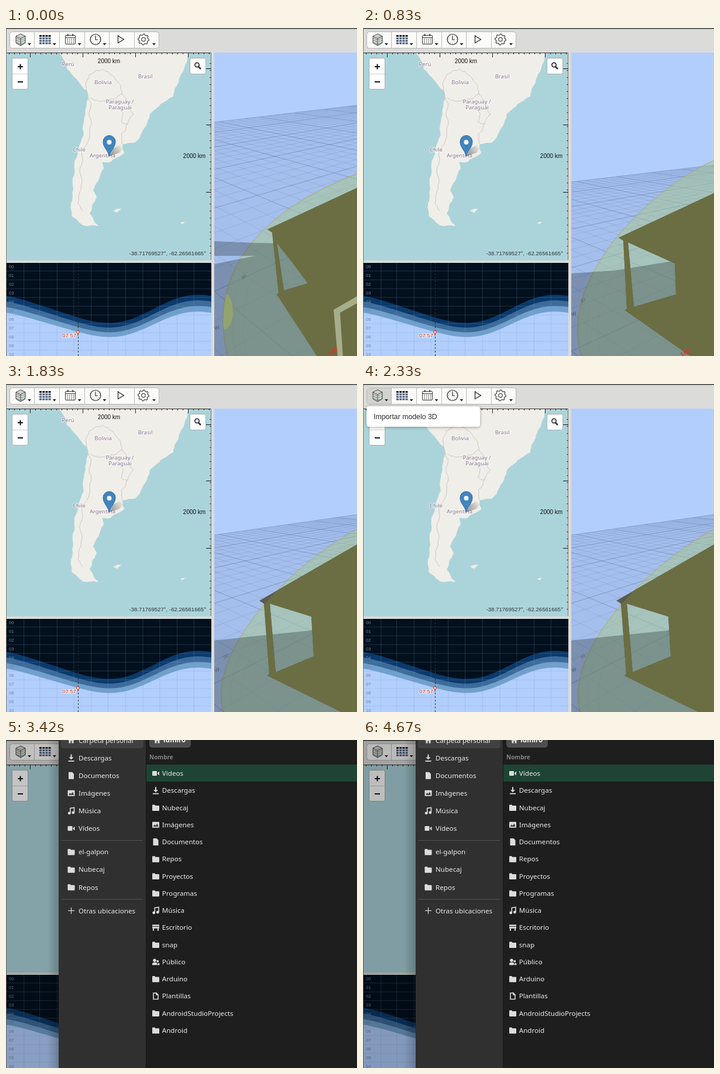
Recreate the animation shown at these times as an HTML page with a canvas. Size 600 px wide and 560 px high, loop 4750 ms.

```html
<!DOCTYPE html>
<html lang="es">
<head>
<meta charset="utf-8">
<title>Modelo 3D</title>
<style>
html, body { margin: 0; width: 100%; height: 100%; overflow: hidden; background: #d9d9d7; }
canvas { display: block; width: 600px; height: 560px; }
</style>
</head>
<body>
<canvas id="stage" width="600" height="560"></canvas>
<script>
const c = document.getElementById('stage').getContext('2d');
const LOOP = 4750, FPS = 12;
const SANS = '"Liberation Sans", sans-serif', NOTO = '"Noto Sans", sans-serif';

// ---------- helpers ----------
function rect(x, y, w, h, fill) { c.fillStyle = fill; c.fillRect(x, y, w, h); }
function box(x, y, w, h, r, fill, stroke) {
  c.beginPath(); c.roundRect(x, y, w, h, r);
  if (fill) { c.fillStyle = fill; c.fill(); }
  if (stroke) { c.strokeStyle = stroke; c.lineWidth = 1; c.stroke(); }
}
function trace(pts) { pts.forEach(([x, y], i) => i ? c.lineTo(x, y) : c.moveTo(x, y)); }
function poly(pts, fill) { c.beginPath(); trace(pts); c.closePath(); c.fillStyle = fill; c.fill(); }
function line(pts, color, width = 1) {
  c.beginPath(); trace(pts); c.strokeStyle = color; c.lineWidth = width; c.stroke();
}
function disc(x, y, r, fill) { c.beginPath(); c.arc(x, y, r, 0, 7); c.fillStyle = fill; c.fill(); }
function ring(x, y, r, color, width = 1) {
  c.beginPath(); c.arc(x, y, r, 0, 7); c.strokeStyle = color; c.lineWidth = width; c.stroke();
}
function text(s, x, y, font, fill, align = 'left') {
  c.font = font; c.fillStyle = fill; c.textAlign = align; c.fillText(s, x, y);
}
function tilted(s, x, y, angle, font, fill) {
  c.save(); c.translate(x, y); c.rotate(angle); text(s, 0, 4, font, fill, 'center'); c.restore();
}
function clipped(x, y, w, h, draw) {
  c.save(); c.beginPath(); c.rect(x, y, w, h); c.clip(); draw(); c.restore();
}
const mix = (a, b, p) => Array.isArray(a) ? a.map((v, i) => mix(v, b[i], p)) : a + (b - a) * p;
const clamp = v => Math.max(0, Math.min(1, v));
const smooth = v => v * v * (3 - 2 * v);
const easeOut = v => 1 - (1 - v) ** 2;

// ---------- 3D view ----------
// Each pose: far edge heights, dome curve, shadow heights, roof tip, eave height, wall foot, wall base, opening
const poses = [
  { edge: [161, 132], dome: [[600, 249], [470, 298], [335, 395], [380, 565]], shade: [364, 367, 369],
    apex: [447, 344], eave: 273, foot: [463, 455], base: 533, hole: [[463, 367], [490, 401], [516, 436], [475, 448]] },
  { edge: [263, 234], dome: [[600, 226], [490, 275], [322, 435], [378, 572]], shade: [419, 414, 398],
    apex: [437, 358], eave: 282, foot: [448, 482], base: 562, hole: [[453, 366], [533, 402], [535, 455], [463, 476]] },
  { edge: [258, 223], dome: [[600, 248], [480, 312], [330, 470], [376, 572]], shade: [438, 430, 420],
    apex: [433, 370], eave: 274, foot: [447, 498], base: 577, hole: [[451, 375], [522, 397], [526, 465], [461, 492]] }
];
const camera = k => smooth(clamp((k - 3) / 7)) + easeOut(clamp((k - 10) / 10));

function grid([left, right]) {
  const hy = left - 100, far = 24400 / (left - right);
  const ray = (vx, off, major) => {
    const at = x => [x, hy + (x - vx) * 100 / off];
    line([at(350), at(606)], major ? 'rgba(72,98,150,.5)' : 'rgba(85,115,175,.26)', .8);
  };
  for (let i = 1, off = far - 25; off > 60; i++, off -= 25) ray(356 + far, -off, i % 5 === 0);
  for (let i = 2; i < 42; i++) ray(-110, i * 24, i % 5 === 0);
}

function domePath(pts, close) {
  c.beginPath(); c.moveTo(...pts[0]); c.bezierCurveTo(...pts.slice(1).flat());
  if (close) { c.lineTo(600, 572); c.closePath(); }
}

function drawView(k) {
  const p = camera(k), i = Math.min(1, Math.floor(p)), v = {};
  for (const part in poses[i]) v[part] = mix(poses[i][part], poses[i + 1][part], p - i);
  const floor = [[356, v.edge[0]], [600, v.edge[1]], [600, 560], [356, 560]];

  rect(356, 42, 244, 518, '#b1cefd');
  c.save();
  poly(floor, '#a5bfec');
  c.clip();
  grid(v.edge);
  c.restore();
  line(floor.slice(0, 2), '#7f9ac9');

  // sky dome with sun paths
  domePath(v.dome, true); c.fillStyle = 'rgba(168,200,142,.5)'; c.fill();
  domePath(v.dome); c.strokeStyle = '#b9a766'; c.lineWidth = 1; c.stroke();
  c.setLineDash([3, 3]);
  for (const s of [.94, .87]) {
    domePath(v.dome.map(([x, y]) => [mix(630, x, s), mix(530, y, s)]));
    c.strokeStyle = 'rgba(185,168,80,.45)'; c.lineWidth = .8; c.stroke();
  }
  c.setLineDash([]);

  // ground shadow with a lit wedge that closes as the camera turns
  const lit = clamp(1 - p), wy = v.shade[0] + 25;
  c.beginPath();
  trace([...v.shade.map((y, j) => [[356, 430, 530][j], y]), [600, v.shade[2]], [600, 560], [356, 560]]);
  c.closePath();
  trace([[356, wy], [356 + 71 * lit, wy], [356, wy + 14 * lit]]); c.closePath();
  c.fillStyle = 'rgba(10,15,15,.27)'; c.fill('evenodd');
  c.save();
  domePath(v.dome, true); c.clip();
  c.beginPath(); c.ellipse(374 - 8 * (1 - lit), 484, 4 + 10 * lit, 8 + 22 * lit, 0, 0, 7);
  c.fillStyle = 'rgba(175,185,75,.45)'; c.fill();
  c.restore();
  tilted('30', 375 + 31 * lit, 464 - 40 * lit, -.6, '8px ' + SANS, 'rgba(60,66,70,.55)');
  tilted('W', 360, 487 + 24 * lit, -.35, '9px ' + SANS, 'rgba(55,65,85,.7)');

  // building: grey where it leaves the dome
  const [ax, ay] = v.apex, [fx, fy] = v.foot;
  const walls = new Path2D(), add = pts => {
    pts.forEach(([x, y], j) => j ? walls.lineTo(x, y) : walls.moveTo(x, y));
    walls.closePath();
  };
  add([v.apex, [600, v.eave], [600, 562], [v.base, 562], v.foot, [fx + 3, fy - 3], [ax + 8, ay + 5]]);
  add(v.hole);
  c.fillStyle = '#5b5b50'; c.fill(walls, 'evenodd');
  c.save();
  domePath(v.dome, true); c.clip();
  c.fillStyle = '#6b6e42'; c.fill(walls, 'evenodd');
  c.restore();
  poly([[560, 481], [600, 458], [600, 470], [571, 486], [576, 562], [567, 562]]
    .map(([x, y]) => [x + 40 * p, y + 110 * p]), '#a7ae8b');
  tilted('180', 558 - 8 * p, 551 + 3 * p + 30 * Math.max(0, p - 1), -.5, 'bold 10px ' + SANS, '#d8352a');
}

// ---------- map ----------
function roughen(pts, amount, seed) {
  const rnd = () => (seed = seed * 16807 % 2147483647) / 2147483647 - .5;
  for (let pass = 0; pass < 3; pass++)
    pts = pts.flatMap((a, i) => {
      const b = pts[i + 1];
      if (!b) return [a];
      const r = rnd() * amount, dx = b[0] - a[0], dy = b[1] - a[1];
      return [a, [a[0] + dx / 2 - dy * r, a[1] + dy / 2 + dx * r]];
    });
  return pts;
}
const coast = roughen([[88, 42], [104, 70], [138, 107], [133, 160], [124, 205], [117, 250], [111, 300],
  [112, 320], [132, 337], [158, 338], [143, 316], [155, 290], [149, 278], [157, 262], [167, 240],
  [164, 229], [180, 228], [202, 214], [199, 199], [220, 196], [237, 170], [246, 147], [264, 130],
  [286, 117], [292, 98], [303, 74], [311, 42]], .2, 11);
const borders = [
  [[138, 107], [142, 150], [133, 205], [127, 250], [123, 300], [131, 312]],
  [[138, 107], [142, 80], [165, 70], [196, 98], [198, 112], [174, 124], [144, 119]],
  [[174, 124], [200, 145], [197, 160], [208, 164], [218, 147], [198, 112]],
  [[207, 164], [197, 182], [198, 198]]
].map((b, i) => roughen(b, .25, 31 + i));
const places = [['Perú', 106, 65], ['Bolivia', 166, 96], ['Brasil', 238, 86], ['Paraguay /', 194.5, 129],
  ['Paraguái', 195, 139], ['Chile', 125, 211], ['Argentina', 165, 221]];

function drawMap() {
  rect(1, 42, 350, 355, '#abd4da');
  poly(coast, '#f0eee8');
  borders.forEach(b => line(b, '#cdc6ca', 1));
  for (const [x, y, r] of [[190, 312, 7], [302, 333, 4]])
    poly([[x - r, y], [x, y - r / 2], [x + r, y - r / 2], [x, y + r / 2]], '#edece4');
  places.forEach(([s, x, y]) => {
    c.strokeStyle = 'rgba(255,255,255,.7)'; c.lineWidth = 2;
    c.font = '9.5px ' + NOTO; c.textAlign = 'center'; c.strokeText(s, x, y);
    text(s, x, y, c.font, '#84708e', 'center');
  });

  line([[1, 42.5], [351, 42.5]], '#333');
  line([[350.5, 42], [350.5, 396]], '#777');
  for (let i = 0; i < 39; i++) rect(5 + i * 9, 42, 1, i % 10 === 4 ? 8 : 3, '#222');
  for (const y of [69, 165, 280]) rect(342, y, 9, 1, '#111');
  for (let y = 60; y < 396; y += 12) rect(348, y, 3, 1, '#444');
  text('2000 km', 176, 60, '10px ' + SANS, '#111', 'center');
  text('2000 km', 322, 222, '10px ' + SANS, '#111', 'center');
  text('-38.71769527°, -62.26561665°', 342, 387.5, '9.6px ' + SANS, '#2b3438', 'right');

  // pin
  const g = c.createLinearGradient(178, 216, 200, 202);
  g.addColorStop(0, 'rgba(60,60,60,.5)'); g.addColorStop(1, 'rgba(60,60,60,0)');
  poly([[177, 219], [183, 206], [194, 200], [200, 205], [194, 213]], g);
  c.beginPath(); c.moveTo(176.5, 219);
  c.bezierCurveTo(174, 208, 166, 204, 166, 194);
  c.arc(176.5, 194, 10.5, Math.PI, 0);
  c.bezierCurveTo(187, 204, 179, 208, 176.5, 219);
  c.fillStyle = '#4085c1'; c.fill(); c.strokeStyle = '#2c6a9f'; c.lineWidth = 1; c.stroke();
  disc(176.5, 195, 4, '#f4f4f0');

  // zoom and search buttons
  box(10.5, 51.5, 27, 53, 3, '#fff', '#a5aeb0');
  rect(11, 78, 26, 1, '#ccc');
  rect(20, 65, 9, 2, '#111'); rect(23.5, 61.5, 2, 9, '#111'); rect(20, 91, 9, 2, '#111');
  box(314.5, 51.5, 27, 27, 3, '#fff', '#a5aeb0');
  ring(326.5, 63, 3.6, '#333', 1.8);
  line([[329, 66], [333, 70]], '#333', 2.6);
}

// ---------- sunlight chart ----------
function dawn(x, band) {
  const year = 2 * Math.PI * (x + 10) / 350;
  return 479.5 + 8.8 * band - (23.5 - .8 * band) * Math.cos(year) + 2.5 * Math.sin(2 * year);
}
function drawChart() {
  rect(1, 401, 350, 159, '#020f1d');
  ['#0a3a6c', '#3c6b9b', '#70a0cb', '#b1cefd'].forEach((color, band) => {
    const pts = [[1, 560]];
    for (let x = 1; x <= 351; x += 5) pts.push([x, dawn(x, band)]);
    poly([...pts, [351, 560]], color);
  });
  const grey = 'rgba(120,150,190,.25)';
  for (let y = 414.5; y < 560; y += 15) rect(1, y, 350, 1, grey);
  for (let m = 1; m < 12; m++) {
    const day = (Date.UTC(2023, m, 1) - Date.UTC(2023, 0, 1)) / 864e5;
    rect(.5 + day * 350 / 365, 401, 1, 159, grey);
  }
  for (let h = 0; h <= 10; h++)
    text(String(h).padStart(2, '0'), 5, 410 + h * 15, '7.5px ' + SANS, '#74889c');
  c.setLineDash([3, 3]);
  line([[123.5, 401], [123.5, 560]], '#2b3038');
  c.setLineDash([]);
  c.font = '9.5px ' + SANS; c.textAlign = 'right';
  c.strokeStyle = 'rgba(255,255,255,.85)'; c.lineWidth = 2; c.strokeText('07:57', 120, 528);
  text('07:57', 120, 528, c.font, '#b3261e', 'right');
  disc(123, 519, 2.6, '#fff'); ring(123, 519, 2.2, '#d93a20', 1.2);
  line([[123, 522], [123, 525]], '#d93a20', 1.2);
}

// ---------- toolbar ----------
function drawToolbar(pressed) {
  rect(0, 0, 600, 42, '#dbdbd9');
  rect(0, 0, 600, 1.5, '#3c3c3c');
  box(6.5, 6.5, 255, 28, 4, '#fbfbfa', '#b5b5b2');
  if (pressed) box(7, 7, 41, 27, [4, 0, 0, 4], '#d2d2cf');
  for (let i = 0; i < 5; i++) {
    const x = 48 + i * 42.8, caret = i < 4 ? x - 8 : 253;
    rect(Math.round(x), 7, 1, 27, '#b9b9b6');
    poly([[caret - 3, 26], [caret + 3, 26], [caret, 29.5]], '#222');
  }

  // cube
  const hex = [[25, 10], [33, 14], [33, 25.5], [25, 30], [17, 25.5], [17, 14]];
  poly(hex, '#f3f3f1'); line([...hex, hex[0]], '#333');
  line([[17, 14], [25, 18], [33, 14]], '#333'); line([[25, 18], [25, 30]], '#333');
  for (let i = 0; i < 3; i++) for (let j = 0; j < 3; j++) {
    rect(18.2 + i * 2.3, 16.6 + j * 3.5 + i * 1.2, 1.4, 2, '#55605a');
    rect(26.4 + i * 2.3, 19 + j * 3.5 - i * 1.2, 1.4, 2, '#4f7a5c');
    rect(21 + i * 2 + j * 2, 13.7 + i - j, 1.2, 1, '#8a7060');
  }
  // table
  for (let i = 0; i < 4; i++) for (let j = 0; j < 4; j++)
    rect(57 + i * 5.2, 12 + j * 4.2, 4, 3, j ? '#4a5d7d' : '#222');
  // calendar
  box(101.5, 12.5, 17, 15, 1.5, '#fff', '#333');
  rect(101, 16, 18, 1, '#333');
  rect(105, 10, 1.5, 4, '#333'); rect(113.5, 10, 1.5, 4, '#333');
  for (let i = 0; i < 4; i++) for (let j = 0; j < 3; j++) rect(104 + i * 3.6, 18.5 + j * 3, 1.8, 1.5, '#666');
  // clock
  ring(153, 19.5, 9, '#222', 1.2);
  line([[153, 13.5], [153, 20], [157, 20]], '#222', 1.2);
  for (let a = 0; a < 6.2; a += Math.PI / 6) rect(152.6 + 7 * Math.cos(a), 19.1 + 7 * Math.sin(a), .9, .9, '#444');
  // play
  line([[191.5, 13.5], [201.5, 19.5], [191.5, 25.5], [191.5, 13], [193, 14.4]], '#222', 1.2);
  // gear
  const gear = [];
  for (let i = 0; i <= 32; i++) {
    const a = i * Math.PI / 16, r = i % 4 < 2 ? 9.4 : 7.6;
    gear.push([235 + r * Math.cos(a), 19.5 + r * Math.sin(a)]);
  }
  line(gear, '#333', 1.1);
  ring(235, 19.5, 3.2, '#333', 1.1);
}

function drawMenu() {
  c.save();
  c.shadowColor = 'rgba(0,0,0,.35)'; c.shadowBlur = 5; c.shadowOffsetY = 1;
  box(6, 38, 194, 35, 4, '#fff');
  c.restore();
  text('Importar modelo 3D', 18, 59.5, '12.3px ' + SANS, '#2b2b2b');
}

// ---------- file dialog ----------
const INK = '#dcdcdc';
const icons = {
  folder() { box(-6, -5, 5, 4, 1, INK); box(-6, -3.5, 12, 9, 1, INK); },
  down() { rect(-1, -6, 2, 6, INK); poly([[-4, -1], [4, -1], [0, 3]], INK); rect(-5, 4.5, 10, 1.8, INK); },
  doc() { poly([[-4.5, -6], [1.5, -6], [4.5, -3], [4.5, 6], [-4.5, 6]], INK); },
  image() { box(-6, -5, 12, 10, 1, INK); poly([[-4.5, 3], [-2, -.5], [0, 1.5], [2.5, -2], [4.5, 3]], '#333'); },
  music() {
    disc(-3.3, 4, 2.4, INK); disc(3.3, 3, 2.4, INK);
    line([[-1.7, 4], [-1.7, -4.5], [5, -5.5], [5, 3]], INK, 1.6);
  },
  video() { box(-6, -4, 8, 8, 1, INK); poly([[2.5, 0], [6, -3.5], [6, 3.5]], INK); },
  desk() { rect(-6, -5, 12, 2.5, INK); rect(-6, -1.5, 12, 3, INK); rect(-5, 1.5, 2, 4, INK); rect(3, 1.5, 2, 4, INK); },
  people() {
    disc(-2, -2.5, 2.7, INK); box(-6, 1, 8.5, 4.5, [3, 3, 0, 0], INK);
    disc(3.2, -1, 2, INK); box(3.2, 2, 3.3, 3.5, [2, 2, 0, 0], INK);
  },
  template() { line([[1, -5.3], [-4, -5.3], [-4, 5.3], [4, 5.3], [4, -2.3], [1, -2.3], [1, -5.3], [4, -2.3]], INK, 1.6); },
  home() { poly([[-6, 0], [0, -6], [6, 0]], INK); rect(-4, -1, 3, 6, INK); rect(1, -1, 3, 6, INK); rect(-2, -2, 4, 3, INK); },
  plus() { rect(-5.5, -.6, 11, 1.2, INK); rect(-.6, -5.5, 1.2, 11, INK); }
};
function entry(icon, label, x, y, gap) {
  c.save(); c.translate(x, y); icons[icon](); c.restore();
  text(label, x + gap, y + 4.2, '11.6px ' + NOTO, '#ececec');
}
const sidebar = [
  [['home', 'Carpeta personal'], ['down', 'Descargas'], ['doc', 'Documentos'], ['image', 'Imágenes'],
    ['music', 'Música'], ['video', 'Vídeos']],
  [['folder', 'el-galpon'], ['folder', 'Nubecaj'], ['folder', 'Repos']],
  [['plus', 'Otras ubicaciones']]];
const files = [['video', 'Vídeos'], ['down', 'Descargas'], ['folder', 'Nubecaj'], ['image', 'Imágenes'],
  ['doc', 'Documentos'], ['folder', 'Repos'], ['folder', 'Proyectos'], ['folder', 'Programas'],
  ['music', 'Música'], ['desk', 'Escritorio'], ['folder', 'snap'], ['people', 'Público'],
  ['folder', 'Arduino'], ['template', 'Plantillas'], ['folder', 'AndroidStudioProjects'], ['folder', 'Android']];

function drawDialog(k) {
  rect(0, 0, 90, 560, `rgba(0,0,0,${.2 + .06 * clamp((k - 39) / 4)})`);
  const g = c.createLinearGradient(70, 0, 90, 0);
  g.addColorStop(0, 'rgba(0,0,0,0)'); g.addColorStop(1, 'rgba(0,0,0,.2)');
  rect(70, 0, 20, 560, g);
  rect(90, 0, 150, 560, '#313030');
  rect(239, 0, 361, 560, '#1d1e1d');
  rect(239, 0, 1, 560, '#191919');
  box(94, -10, 141, 24, 4, '#414141');
  let y = .5;
  sidebar.forEach((group, i) => {
    if (i) { rect(94, y - 10, 140, 1, '#555'); y += 10; }
    group.forEach(([icon, label]) => { entry(icon, label, 111.5, y, 12.5); y += 30.1; });
  });
  box(245, -12, 71, 25, 5, '#4e4e4e');
  c.save(); c.translate(258.5, .5); icons.home(); c.restore();
  text('lumiro', 269, 4.2, 'bold 11.6px ' + NOTO, '#f2f2f2');
  text('Nombre', 245, 33, 'bold 10px ' + NOTO, '#858585');
  rect(240, 42, 360, 29, '#1d4434');
  files.forEach(([icon, label], i) => entry(icon, label, 256, 57 + i * 29.25, 10.8));
}

// ---------- playback ----------
function draw(k) {
  const menu = k >= 23 && k < 33;
  rect(0, 0, 600, 560, '#dbdbd9');
  clipped(1, 42, 350, 355, drawMap);
  clipped(1, 401, 350, 159, drawChart);
  clipped(356, 42, 244, 518, () => drawView(k));
  drawToolbar(menu);
  rect(0, 0, 1, 560, '#777');
  if (menu) drawMenu();
  if (k >= 38) drawDialog(k);
}

const start = performance.now();
let shown = -1;
function tick() {
  const t = (performance.now() - start) % LOOP;
  const k = Math.floor((t + 5) * FPS / 1000);
  if (k !== shown) draw(shown = k);
  requestAnimationFrame(tick);
}
tick();
</script>
</body>
</html>
```
